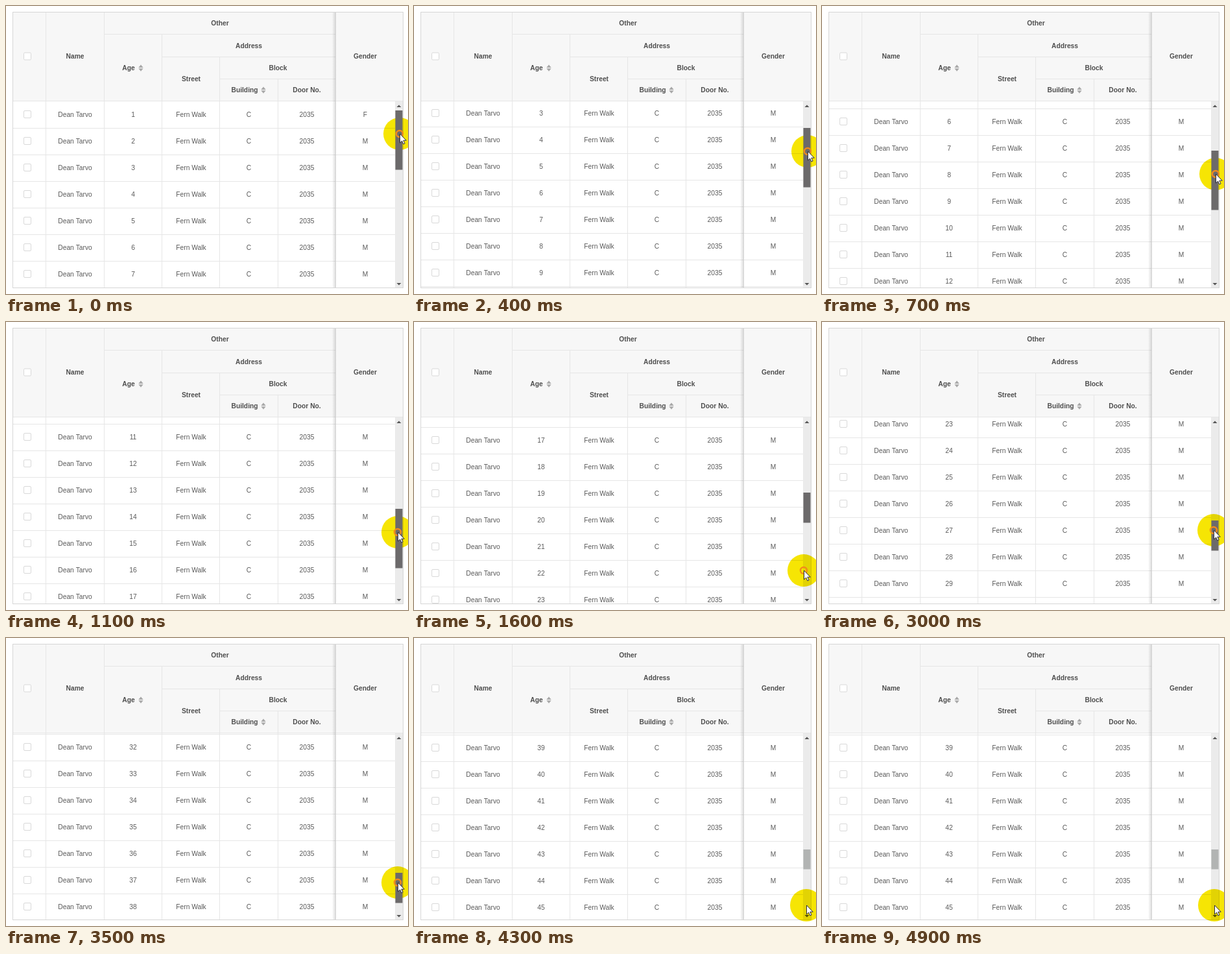
Animation of 620 by 444 pixels, one loop 6100 ms. Source, as an HTML page with a canvas:

```html
<!DOCTYPE html>
<html lang="en">
<head>
<meta charset="utf-8">
<title>Scrolling table</title>
<style>
  html, body { margin: 0; width: 100%; height: 100%; overflow: hidden; background: #fff; }
  canvas { display: block; }
</style>
</head>
<body>
<canvas id="stage" width="620" height="444"></canvas>
<script>
const ctx = document.getElementById('stage').getContext('2d');

const LOOP = 6100, STEP = 100, LAST = 4900;
const ROW = 41, PAGE = 20, VIEW = 287;
const TOP = 147, BOTTOM = 434;
const TRACK_Y = 161, TRACK = 260;
const LINE = '#e6e6e6', EDGE = '#d6d6d6', HEAD = '#f7f7f7';
const COLS = [61, 151, 240, 329, 419];

// Pointer path: time, x, y
const PATH = [
  [0, 607, 197], [700, 607, 258.5], [1600, 601, 383.1], [1800, 601, 383.1],
  [2400, 604, 277.5], [2500, 604, 277.5], [2600, 604, 280.8],
  [3500, 604, 377.2], [4200, 605, 411.9], [LAST, 605, 411.9]
];

const slope = (i, k) => (PATH[i + 1][k] - PATH[i][k]) / (PATH[i + 1][0] - PATH[i][0]);

function tangent(i, k) {
  if (i === 0 || i === PATH.length - 1) return 0;
  const a = slope(i - 1, k), b = slope(i, k);
  return a * b <= 0 ? 0 : 2 * a * b / (a + b);
}

// Monotone cubic interpolation along the path
function along(t, k) {
  let i = 0;
  while (i < PATH.length - 2 && t >= PATH[i + 1][0]) i++;
  const [p, q] = [PATH[i], PATH[i + 1]];
  const h = q[0] - p[0], u = (t - p[0]) / h, v = 1 - u;
  return p[k] * (1 + 2 * u) * v * v + tangent(i, k) * h * u * v * v
       + q[k] * u * u * (3 - 2 * u) - tangent(i + 1, k) * h * u * u * v;
}

// Dragging the thumb by dy; reaching the end loads another page of rows
function drag(start, rows, dy) {
  const rate = rows * ROW / TRACK;
  const end = rows * ROW - VIEW;
  const top = start + dy * rate;
  if (top <= end) return { top, rows };
  const rest = dy - (end - start) / rate;
  rows += PAGE;
  return { top: end + rest * rows * ROW / TRACK, rows };
}

function stateAt(t) {
  const x = along(t, 1), y = along(t, 2);
  let list = drag(0, PAGE, (t < 1700 ? y : PATH[2][2]) - PATH[0][2]);
  if (t >= 2500) list = drag(list.top, list.rows, y - PATH[5][2]);
  return { x, y, rows: list.rows, top: list.top, down: t < 1700 || (t >= 2500 && t < 4300) };
}

function rect(x, y, w, h, color) {
  ctx.fillStyle = color;
  ctx.fillRect(x, y, w, h);
}
const hline = (x, y, w) => rect(x, y, w, 1, LINE);
const vline = (x, y, h) => rect(x, y, 1, h, LINE);

function label(text, x, y, bold) {
  ctx.font = (bold ? 'bold ' : '') + '10.25px "Liberation Sans", Arial, sans-serif';
  ctx.fillStyle = bold ? '#4e4e4e' : '#595959';
  ctx.textAlign = 'center';
  ctx.fillText(text, x, y + 4);
}

// Triangle pointing up (h > 0) or down (h < 0) from its base line
function triangle(x, base, half, h, color) {
  ctx.fillStyle = color;
  ctx.beginPath();
  ctx.moveTo(x - half, base);
  ctx.lineTo(x + half, base);
  ctx.lineTo(x, base - h);
  ctx.fill();
}

function sorter(x, y) {
  triangle(x, y - 0.5, 3.7, 4.5, '#a9a9a9');
  triangle(x, y + 0.8, 3.7, -4.5, '#a9a9a9');
}

function checkbox(x, y) {
  ctx.beginPath();
  ctx.roundRect(x - 5.5, y - 5.5, 11, 11, 1.5);
  ctx.fillStyle = '#fff';
  ctx.fill();
  ctx.strokeStyle = '#d9d9d9';
  ctx.lineWidth = 1;
  ctx.stroke();
}

function drawRows(top) {
  ctx.save();
  ctx.beginPath();
  ctx.rect(11, TOP, 601, VIEW);
  ctx.clip();
  const first = Math.floor(top / ROW);
  for (let i = first; i < first + 9; i++) {
    const y = 167 + i * ROW - top;
    checkbox(33, y);
    label('Dean Tarvo', 106.5, y);
    label(i + 1, 196, y);
    label('Fern Walk', 285.5, y);
    label('C', 374.5, y);
    label('2035', 464, y);
    label(i ? 'M' : 'F', 554, y);
    hline(11, y + 21, 589);
  }
  COLS.forEach(x => vline(x, TOP, VIEW));
  ctx.restore();
}

function drawHeader() {
  rect(11, 10, 601, 136, HEAD);
  hline(11, 146, 601);
  hline(151, 43, 357);
  hline(240, 78, 268);
  hline(329, 112, 179);
  [10, 10, 44, 79, 113].forEach((y, i) => vline(COLS[i], y, 136 - y + 10));
  checkbox(33, 77.5);
  label('Name', 106.5, 77, true);
  label('Other', 330, 26, true);
  label('Age', 189, 95, true);
  sorter(208, 95.5);
  label('Address', 374.5, 61, true);
  label('Street', 285.5, 112, true);
  label('Block', 419.5, 95, true);
  label('Building', 368, 129, true);
  sorter(397, 129.5);
  label('Door No.', 464, 129, true);
  label('Gender', 554, 77, true);
}

function drawFrame() {
  const shade = ctx.createLinearGradient(503, 0, 508, 0);
  shade.addColorStop(0, 'rgba(0,0,0,0)');
  shade.addColorStop(1, 'rgba(0,0,0,.13)');
  rect(503, 10, 5, 425, shade);
  rect(508, 10, 1, 425, '#d4d4d4');
  ctx.strokeStyle = EDGE;
  ctx.lineWidth = 1;
  ctx.strokeRect(10.5, 9.5, 602, 425);
}

function drawThumb({ top, rows, down }) {
  const scale = TRACK / (rows * ROW);
  rect(600.5, Math.round(TRACK_Y + top * scale), 11, Math.round(VIEW * scale) + 0.5,
    down ? '#6c6a6b' : '#b2b4b3');
}

function drawSpot(x, y) {
  ctx.globalCompositeOperation = 'multiply';
  ctx.fillStyle = '#f6e504';
  ctx.beginPath();
  ctx.arc(x, y, 25, 0, Math.PI * 2);
  ctx.fill();
  ctx.globalCompositeOperation = 'source-over';
}

function drawRing(x, y) {
  ctx.strokeStyle = '#f28a1c';
  ctx.lineWidth = 2.4;
  ctx.beginPath();
  ctx.arc(x, y, 5, 0, Math.PI * 2);
  ctx.stroke();
}

function drawPointer(x, y) {
  const tip = [[0, 0], [0, 14], [3.2, 11], [5.4, 16], [7.6, 15], [5.4, 10.2], [9.8, 10.2]];
  ctx.beginPath();
  tip.forEach(([dx, dy]) => ctx.lineTo(x + dx + 0.5, y + dy));
  ctx.closePath();
  ctx.fillStyle = '#fff';
  ctx.fill();
  ctx.strokeStyle = '#2b2b38';
  ctx.lineWidth = 1;
  ctx.stroke();
}

function draw(t) {
  const s = stateAt(t);
  const x = Math.round(s.x), y = Math.round(s.y);
  rect(0, 0, 620, 444, '#fff');
  drawRows(Math.round(s.top));
  drawHeader();
  rect(600, TOP, 12, VIEW, '#ebebeb');
  drawFrame();
  triangle(606, 156, 3.5, 3.5, '#555');
  triangle(606, 427, 3.5, -3.5, '#555');
  if (!s.down) drawThumb(s);
  drawSpot(x, y);
  if (s.down) {
    drawThumb(s);
    drawRing(x, y);
  }
  drawPointer(x, y);
}

const begin = performance.now();
function tick() {
  const t = (performance.now() - begin) % LOOP;
  draw(Math.min(LAST, Math.floor(t / STEP) * STEP));
  requestAnimationFrame(tick);
}
tick();
</script>
</body>
</html>
```
